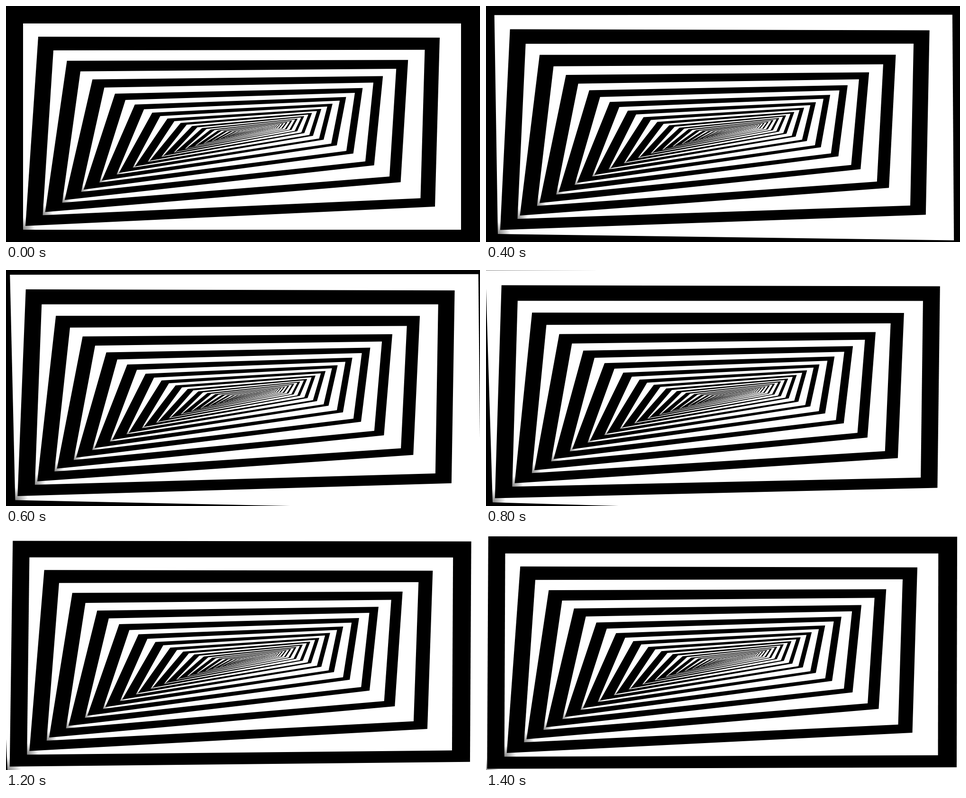
An HTML page with a canvas for the animation above (1500 ms loop, 1000x500 px).

```html
<!DOCTYPE html>
<html lang="en">
<head>
<meta charset="utf-8">
<title>Endless tunnel</title>
<style>
  html, body { margin: 0; width: 100%; height: 100%; overflow: hidden; background: #000; }
  canvas { display: block; width: 100%; height: 100%; }
</style>
</head>
<body>
<canvas id="stage" width="1000" height="500"></canvas>
<script>
const ctx = document.getElementById('stage').getContext('2d');
const STEP_MS = 100, STEPS = 15, RINGS = 32;

// The tunnel is one projective map applied over and over. It has three fixed
// points; moving one ring deeper shrinks the weights of the two outer ones.
const CENTRE = [539.63, 260.72], SIDE = [-704.1, 515.3], FAR = [-21918, -65863];
const SIDE_DECAY = 0.851894, FAR_DECAY = 0.747183;

// Corners: top left, top right, bottom right, bottom left
const WHITE = [[36, 37], [960, 37], [960, 474], [36, 474]].map(toWeights);
const BLACK = [[68, 65], [915, 67], [905, 425], [41, 466]].map(toWeights);

function toWeights([x, y]) {
  const [px, py] = [x - CENTRE[0], y - CENTRE[1]];
  const [sx, sy] = [SIDE[0] - CENTRE[0], SIDE[1] - CENTRE[1]];
  const [fx, fy] = [FAR[0] - CENTRE[0], FAR[1] - CENTRE[1]];
  const det = sx * fy - sy * fx;
  const side = (px * fy - py * fx) / det;
  const far = (sx * py - sy * px) / det;
  return { side, far, centre: 1 - side - far };
}

function cornerAt(weights, depth) {
  const side = weights.side * SIDE_DECAY ** depth;
  const far = weights.far * FAR_DECAY ** depth;
  const total = side + far + weights.centre;
  return [0, 1].map(i =>
    (side * SIDE[i] + far * FAR[i] + weights.centre * CENTRE[i]) / total);
}

function fillQuad(corners, fill) {
  ctx.fillStyle = fill;
  ctx.beginPath();
  corners.forEach(([x, y]) => ctx.lineTo(x, y));
  ctx.fill();
}

// White with a small soft shadow in the bottom left corner
function shadedWhite([, , [rightX], [x, y]]) {
  const shade = ctx.createRadialGradient(x, y, 0, x, y, (rightX - x) * 0.028);
  shade.addColorStop(0, '#808080');
  shade.addColorStop(1, '#fff');
  return shade;
}

function draw(phase) {
  ctx.fillStyle = '#000';
  ctx.fillRect(0, 0, 1000, 500);
  for (let ring = 0; ring < RINGS; ring++) {
    const place = weights => cornerAt(weights, ring - phase);
    const white = WHITE.map(place);
    fillQuad(white, shadedWhite(white));
    fillQuad(BLACK.map(place), '#000');
  }
}

function tick() {
  draw(Math.floor(performance.now() / STEP_MS) % STEPS / STEPS);
  requestAnimationFrame(tick);
}
tick();
</script>
</body>
</html>
```
